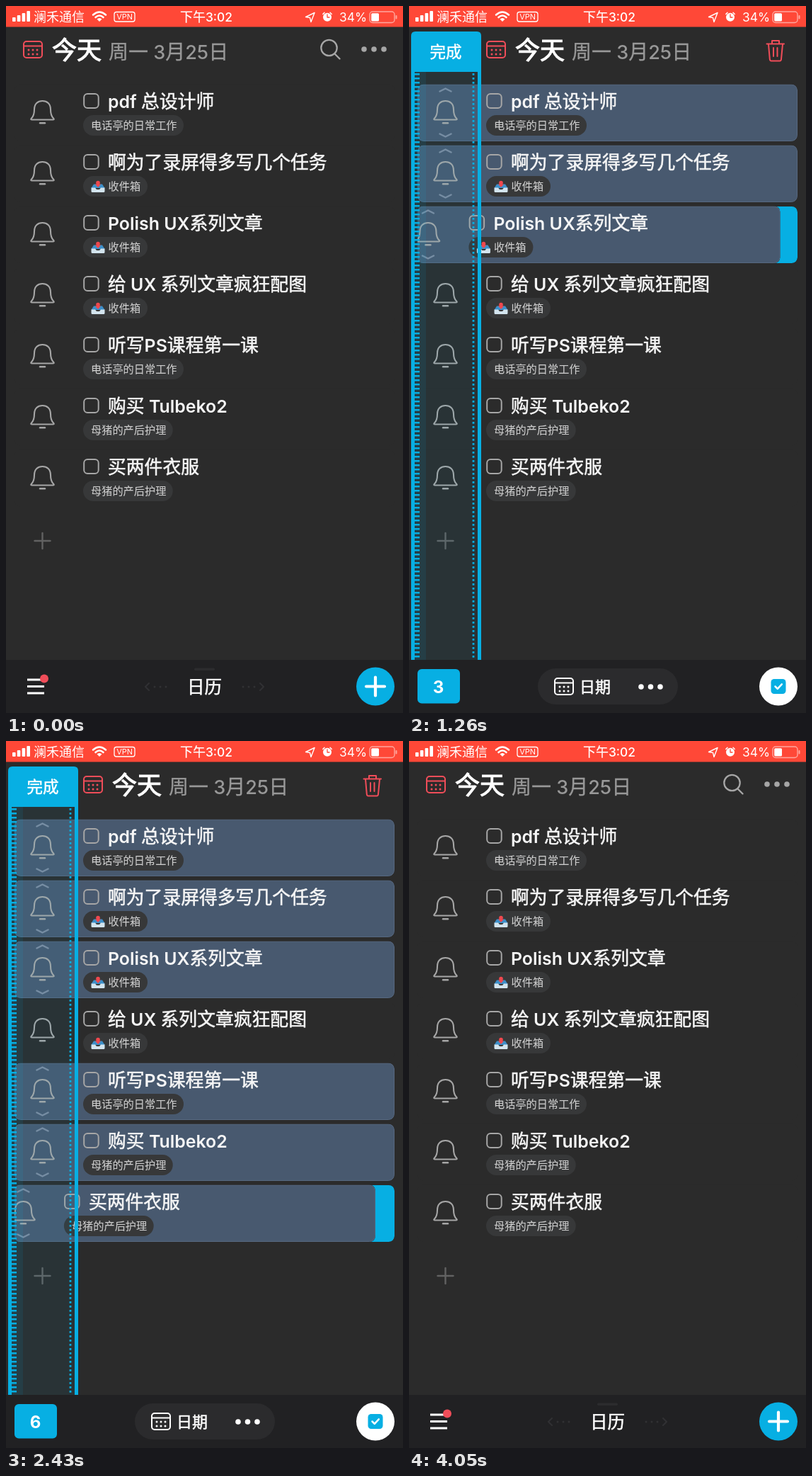
An HTML page that plays this animation: 561x998 px, repeating every 4.32 s.

```html
<!DOCTYPE html>
<html lang="zh-CN">
<head>
<meta charset="utf-8">
<title>今天</title>
<style>
html, body { margin: 0; width: 100%; height: 100%; overflow: hidden; background: #2b2b2b; }
svg { display: block; width: 561px; height: 998px; }
text { font-family: Inter, "Noto Sans CJK SC", sans-serif; white-space: pre; }
.line { fill: none; stroke-linecap: round; stroke-linejoin: round; }
</style>
</head>
<body>
<svg id="stage" viewBox="0 0 561 998" xmlns="http://www.w3.org/2000/svg"></svg>
<script>
const LOOP = 4320, STEP = 30, EXIT = 3600;
const BLUE = '#07afe3', BG = '#2b2b2b', RED = '#f04d59', GREY = '#a6a6a6', PICKED = '#48596f';
const stage = document.getElementById('stage');

function el(parent, tag, attrs = {}) {
  const node = document.createElementNS('http://www.w3.org/2000/svg', tag);
  for (const k in attrs) node.setAttribute(k, attrs[k]);
  parent.appendChild(node);
  return node;
}
const group = (p, attrs) => el(p, 'g', attrs);
const rect = (p, x, y, width, height, fill, rx = 0, more = {}) =>
  el(p, 'rect', { x, y, width, height, fill, rx, ...more });
const disc = (p, cx, cy, r, fill) => el(p, 'circle', { cx, cy, r, fill });
const line = (p, d, stroke, width = 2) =>
  el(p, 'path', { d, stroke, 'stroke-width': width, class: 'line' });

// Latin runs are a little smaller; Chinese runs get their weight from a thin outline.
function label(p, str, x, cy, size, fill, weight = 600, anchor = 'start') {
  const t = el(p, 'text', { x, y: cy + size * 0.37, 'font-size': size, fill, 'text-anchor': anchor });
  const bold = size * (weight - 400) * 0.00011;
  for (const run of str.match(/[ -~]+|[^ -~]+/g)) {
    const style = /[ -~]/.test(run)
      ? { 'font-size': size * 0.965, 'font-weight': weight }
      : { 'font-weight': 400, stroke: fill, 'stroke-width': bold };
    el(t, 'tspan', style).textContent = run;
  }
  return t;
}

function calendar(p, x, y, color) {
  const g = group(p, { transform: `translate(${x} ${y})` });
  rect(g, 1, 1, 26, 23, 'none', 4, { stroke: color, 'stroke-width': 2 });
  line(g, 'M1 7.5H27', color, 2);
  for (let i = 0; i < 6; i++) disc(g, 8 + (i % 3) * 6, 13 + (i > 2) * 6, 1.5, color);
}

function bell(p) {
  line(p, 'M37 160.500Q34 160.500 36 158.500Q40 154.500 40 146C40 138 45 134 51.500 134C58 134 63 138 63 146Q63 154.500 67 158.500Q69 160.500 66 160.500Z', GREY, 2.1);
  line(p, 'M48 165.300H55', GREY, 2.4);
}

function tray(p) {
  el(p, 'path', { d: 'M124 165.500H136L139.500 171H120.500Z', fill: '#3c8fc9' });
  el(p, 'path', { d: 'M120.500 170.500H126L128 173H132L134 170.500H139.500V175.500Q139.500 177 138 177H122Q120.500 177 120.500 175.500Z', fill: '#d3e4ee' });
  disc(p, 130, 163.5, 2.8, '#f0484e');
  el(p, 'path', { d: 'M126 165.500H134L130 170Z', fill: '#f0484e' });
}

// swipe: start, furthest point, release
const INBOX = '收件箱', WORK = '电话亭的日常工作', CARE = '母猪的产后护理';
const tasks = [
  { name: 'pdf 总设计师', tag: WORK, swipe: [150, 450, 696], pick: 330 },
  { name: '啊为了录屏得多写几个任务', tag: INBOX, swipe: [805, 935, 935], pick: 895 },
  { name: 'Polish UX系列文章', tag: INBOX, swipe: [1040, 1170, 1170], pick: 1130 },
  { name: '给 UX 系列文章疯狂配图', tag: INBOX },
  { name: '听写PS课程第一课', tag: WORK, swipe: [1755, 1885, 1885], pick: 1845 },
  { name: '购买 Tulbeko2', tag: CARE, swipe: [1985, 2115, 2115], pick: 2075 },
  { name: '买两件衣服', tag: CARE, swipe: [2218, 2348, 2348], pick: 2308 }
];

rect(stage, 0, 0, 561, 998, BG);
const clip = el(el(stage, 'defs'), 'clipPath', { id: 'row' });
rect(clip, 12, 110.5, 537, 80.5, '#000', 8);

const rows = tasks.map((task, i) => {
  const g = group(stage, { transform: `translate(0 ${i * 86})`, 'clip-path': 'url(#row)' });
  const back = group(g);
  rect(back, 12, 111, 537, 80, BLUE, 8);
  for (const y of [135, 150.5, 166]) disc(back, 506, y, 4, '#fff');
  const move = group(g);
  rect(move, 12, 110.5, 537, 80.5, BG, 8);
  const fill = rect(move, 12.5, 111, 536, 79.5, PICKED, 8, { stroke: '#566880' });
  const arrows = group(move);
  line(arrows, 'M43.500 120.500L51.500 116.500L59.500 120.500M43.500 180.500L51.500 184.500L59.500 180.500', '#7d8b9f', 2.5);
  bell(move);
  rect(move, 110.2, 124, 20.5, 20, 'none', 5, { stroke: GREY, 'stroke-width': 2 });
  label(move, task.name, 144, 134, 25.8, '#f6f6f6');
  const inbox = task.tag === INBOX;
  rect(move, 109, 154, inbox ? 91 : 20 + task.tag.length * 15.25, 29, '#373839', 14.5);
  if (inbox) tray(move);
  label(move, task.tag, inbox ? 144.5 : 120, 168.5, 15.2, '#cdcdcd', 450);
  return { back, move, fill, arrows };
});

line(stage, 'M40.500 755H62.500M51.500 744V766', '#626262', 2.4);

// Header
const head = group(stage);
calendar(head, 24, 49, RED);
label(head, '今天', 65, 62, 35, '#fff', 700);
label(head, '周一 3月25日', 145, 65, 28, '#989898', 500);
const tools = group(stage);
el(tools, 'circle', { cx: 456.5, cy: 59, r: 11.2, fill: 'none', stroke: GREY, 'stroke-width': 2.3 });
line(tools, 'M464.500 67.500L471.500 74.500', GREY, 2.4);
for (const x of [506, 520, 534]) disc(tools, x, 61, 3.8, GREY);
const trash = group(stage);
line(trash, 'M505.500 53.500H530M513 53V49H523V53M508 54L509.800 75Q510 77.500 512 77.500H524Q525.800 77.500 526 75L528 54M515 59V71M520.500 59V71', RED, 2);

// Side ruler
const panel = group(stage);
rect(panel, 3, 93, 99, 830, BLUE, 0, { opacity: 0.055 });
rect(panel, 3, 93, 21, 830, BLUE, 0, { opacity: 0.09 });
rect(panel, 3, 93, 5, 830, BLUE);
el(panel, 'path', { d: 'M11.500 95V923', stroke: BLUE, 'stroke-width': 7, 'stroke-dasharray': '2.5 3.5' });
el(panel, 'path', { d: 'M91 95V923', stroke: BLUE, 'stroke-width': 2.8, 'stroke-dasharray': '2.8 3.2' });
rect(panel, 97, 80, 5, 843, BLUE);
el(panel, 'path', { d: 'M3 93V42Q3 36 9 36H96Q102 36 102 42V93Z', fill: BLUE });
label(panel, '完成', 52, 65, 22.5, '#fff', 600, 'middle');

// Bottom bar
rect(stage, 0, 923, 561, 75, '#212123');
const idle = group(stage);
rect(idle, 266, 934.5, 29, 3.5, '#2c2c2e', 1.7);
label(idle, '日历', 280.5, 961, 24.5, '#fff', 600, 'middle');
const hints = group(idle);
const HINT = '#313133';
line(hints, 'M202 956L197 961L202 966M359 956L364 961L359 966', HINT);
for (let i = 0; i < 3; i++) {
  disc(hints, 210 + i * 8, 961, 1.5, HINT);
  disc(hints, 335 + i * 8, 961, 1.5, HINT);
}
const menu = group(idle);
for (const y of [951, 960.5, 970]) rect(menu, 30, y - 1.5, 24, 3, '#fff');
disc(idle, 54, 949.5, 6, RED);
disc(idle, 522, 960.5, 27, BLUE);
line(idle, 'M509 960.500H535M522 947.500V973.500', '#fff', 4.2);

const editing = group(stage);
rect(editing, 12, 936, 60, 48.5, BLUE, 6);
const count = label(editing, '1', 41.5, 961, 25, '#fff', 700, 'middle').firstChild;
rect(editing, 182, 935, 198, 51, '#2b2b2d', 25.5);
calendar(editing, 205, 948, '#fff');
label(editing, '日期', 241, 961, 22, '#fff');
for (const x of [328, 341.5, 355]) disc(editing, x, 961, 3.8, '#fff');
disc(editing, 522, 960.5, 27, '#fff');
rect(editing, 511.5, 950, 21, 21, BLUE, 4.5);
line(editing, 'M517.500 960.500L520.800 963.800L526.800 957.300', '#fff', 2.5);

// Status bar
rect(stage, 0, 0, 561, 29.5, '#ff4837');
for (let i = 0; i < 4; i++) rect(stage, 9 + i * 6.8, 16 - i * 3, 4.6, 6 + i * 3, '#fff', 1);
label(stage, '澜禾通信', 39, 15.5, 18, '#fff', 400);
line(stage, 'M123 12.500Q132 4.500 141 12.500M126.500 16Q132 11 137.500 16', '#fff', 2.6);
el(stage, 'path', { d: 'M128.500 18.500Q132 15.500 135.500 18.500L132 22Z', fill: '#fff' });
rect(stage, 153, 8.5, 29, 13.5, 'none', 3, { stroke: '#fff', 'stroke-width': 1.3 });
label(stage, 'VPN', 167.5, 15.3, 11.3, '#fff', 400, 'middle');
label(stage, '下午3:02', 283, 15.5, 18, '#fff', 500, 'middle');
line(stage, 'M436 9.500L423.500 15.500L429.500 16.500L431 22.500Z', '#fff', 1.4);
disc(stage, 454, 15.8, 6, '#fff');
line(stage, 'M447.800 11.500L450 9.300M458 9.300L460.200 11.500', '#fff', 1.5);
line(stage, 'M454 12V16H457', '#ff4837', 1.3);
label(stage, '34%', 471, 15.5, 18, '#fff', 400);
rect(stage, 514, 8, 35, 15.5, 'none', 4, { stroke: '#ffa79e', 'stroke-width': 1.4 });
rect(stage, 516.2, 10.2, 10.8, 11.2, '#fff', 1.5);
rect(stage, 550.5, 13, 2, 5.5, '#ffa79e', 1);

const ramp = (t, start, length) => Math.min(1, Math.max(0, (t - start) / length));
const easeOut = u => 1 - (1 - u) ** 2;
const show = (node, on) => { node.style.display = on ? '' : 'none'; };
const slide = (node, x) => node.setAttribute('transform', `translate(${x.toFixed(2)} 0)`);
const fade = (node, v) => { node.style.opacity = v; show(node, v > 0); };

function swipeAt(t, [start, peak, release]) {
  return -60 * easeOut(ramp(t, start, peak - start)) * (1 - ramp(t, release, 250)) ** 2;
}

function draw(t) {
  const active = t >= 330 && t < EXIT;
  const leaving = t >= EXIT;
  let picked = 0;
  tasks.forEach((task, i) => {
    const row = rows[i];
    const x = task.swipe ? swipeAt(t, task.swipe) : 0;
    const on = task.pick !== undefined && t >= task.pick;
    if (on) picked++;
    slide(row.move, x);
    show(row.back, x < -0.1);
    show(row.arrows, on && !leaving);
    fade(row.fill, on ? 1 - ramp(t, 3630, 180) : 0);
  });

  const inward = easeOut(ramp(t, 330, 300));
  slide(panel, -104 * (leaving ? easeOut(ramp(t, 3570, 330)) : 1 - inward));
  slide(head, 85 * (leaving ? 1 - easeOut(ramp(t, 3588, 390)) : inward));
  const edit = leaving ? 1 - ramp(t, 3630, 180) : ramp(t, 330, 150);
  fade(trash, edit);
  fade(tools, 1 - edit);

  show(editing, active);
  show(idle, !active);
  const back = leaving ? ramp(t, 3660, 180) : 1;
  fade(menu, back);
  fade(hints, back);
  count.textContent = picked;
}

const t0 = performance.now();
function frame(now) {
  const t = Math.max(0, now - t0) % LOOP;
  draw(Math.floor(t / STEP) * STEP);
  requestAnimationFrame(frame);
}
draw(0);
requestAnimationFrame(frame);
</script>
</body>
</html>
```
